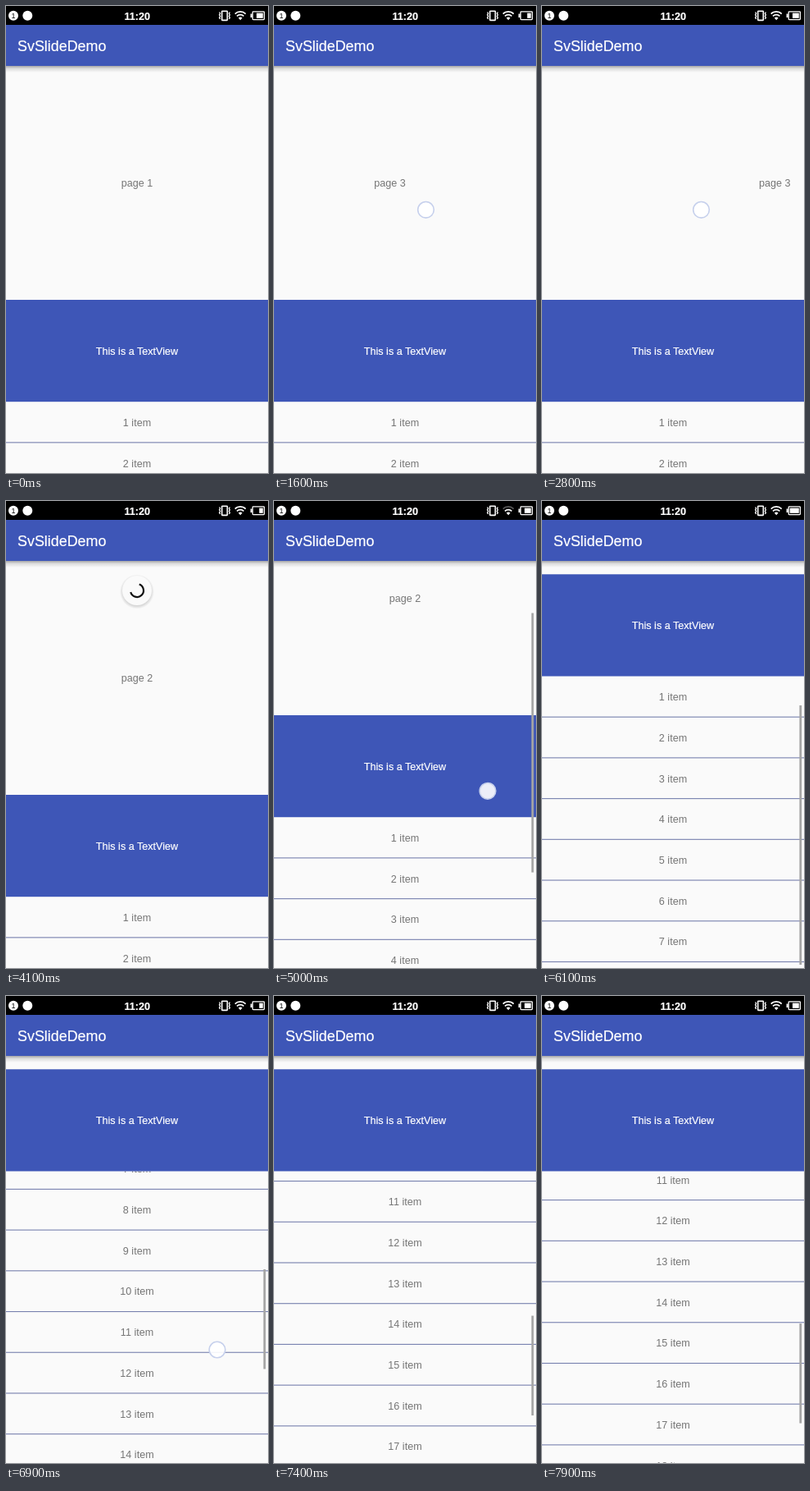
Write an HTML page that moves like this. It is 320 px wide and 569 px high and loops after 8000 ms.

```html
<!DOCTYPE html>
<html lang="en">
<head>
<meta charset="utf-8">
<title>SvSlideDemo</title>
<style>
html, body { margin: 0; width: 100%; height: 100%; overflow: hidden; background: #fafafa; }
svg { display: block; width: 100vw; height: 100vh; }
text { font: 12.6px "Liberation Sans", Arial, sans-serif; text-anchor: middle; fill: #757575; }
text.light { fill: #fff; stroke: #fff; stroke-width: .2; }
</style>
</head>
<body>
<svg id="stage" viewBox="0 0 320 569">
  <defs>
    <linearGradient id="shade" x1="0" y1="0" x2="0" y2="1">
      <stop offset="0" stop-color="#000" stop-opacity=".34"/>
      <stop offset=".4" stop-color="#000" stop-opacity=".12"/>
      <stop offset="1" stop-color="#000" stop-opacity="0"/>
    </linearGradient>
    <radialGradient id="halo">
      <stop offset=".82" stop-color="#000" stop-opacity=".14"/>
      <stop offset="1" stop-color="#000" stop-opacity="0"/>
    </radialGradient>
    <clipPath id="below"><rect id="window" width="320" height="569"/></clipPath>
  </defs>
  <rect width="320" height="569" fill="#fafafa"/>
  <g id="pages"></g>
  <g clip-path="url(#below)"><g id="list"></g></g>
  <g id="header">
    <rect width="320" height="124.2" fill="#3e56b7"/>
    <text class="light" x="160" y="66.8">This is a TextView</text>
  </g>
  <rect id="bar" x="314.4" width="2.8" fill="#a5a5a5"/>
  <g id="spinner">
    <circle cy="1.5" r="21" fill="url(#halo)"/>
    <circle r="18" fill="#fafafa"/>
    <path id="arc" fill="none" stroke="#111" stroke-width="2.2"/>
    <path id="arrow" d="M-3.5 0h7l-3.5 4z" fill="#111"/>
  </g>
  <rect y="73" width="320" height="8" fill="url(#shade)"/>
  <rect y="23" width="320" height="50" fill="#3e56b7"/>
  <text class="light" x="14" y="55" style="font-size:17.9px;text-anchor:start">SvSlideDemo</text>
  <g id="status">
    <rect width="320" height="23" fill="#000"/>
    <circle cx="9" cy="11.7" r="6" fill="#fff"/>
    <text x="9" y="15" style="font-size:9px;fill:#000">1</text>
    <circle cx="26.3" cy="11.7" r="6" fill="#fff"/>
    <text class="light" x="160.3" y="16.6" style="font-size:12.7px;font-weight:bold">11:20</text>
    <g fill="none" stroke="#fff" stroke-width="1.3">
      <rect x="263.7" y="6.2" width="6.6" height="11.2" rx=".6" stroke-width="1.6"/>
      <path d="M260.6 7.5l1 1.6-1 1.7 1 1.7-1 1.7 1 1.6M273.4 7.5l-1 1.6 1 1.7-1 1.7 1 1.7-1 1.6"/>
      <path id="wifi" d="M279.7 9.6a9.3 9.3 0 0 1 13 0" stroke-width="1.7"/>
      <path d="M282 12.4a6 6 0 0 1 8.4 0" stroke-width="1.7"/>
      <rect x="301.2" y="6.8" width="14.2" height="9.8" rx=".8"/>
    </g>
    <path d="M283.8 14.6a3.4 3.4 0 0 1 4.8 0l-2.4 2.6z" fill="#fff"/>
    <rect x="298.6" y="9.5" width="2" height="4.5" fill="#fff"/>
    <rect id="charge" y="8.6" height="6.2" fill="#fff"/>
  </g>
  <circle id="touch" r="9.8" fill="#fff" fill-opacity=".9" stroke="#c6d0ec" stroke-width="1.6"/>
</svg>
<script>
const LOOP = 8000, STEP = 100, ROW = 49.72, HEAD_Y = 358, HEAD_H = 124.2;
const $ = id => document.getElementById(id);

// page swipes: start time and direction, +1 to the next page
const SWIPE_MS = 500;
const swipes = [[100, 1], [900, 1], [1500, 1], [2050, -1], [2580, -1]]
  .map(([start, dir]) => ({ start, dir }));

// vertical finger strokes
const drags = [
  { start: 3300, ms: 500, x: 208, from: 250, to: 435 },
  { start: 4800, ms: 300, x: 261, from: 480, to: 290 },
  { start: 5600, ms: 300, x: 256, from: 360, to: 374 },
  { start: 6300, ms: 200, x: 257, from: 495, to: 345 },
  { start: 6800, ms: 200, x: 258, from: 480, to: 382 }
];

const mix = (a, b, k) => a + (b - a) * k;
const phase = (t, start, ms) => Math.max(0, Math.min(1, (t - start) / ms));
const smooth = k => k * k * (3 - 2 * k);
const smoother = k => k * k * k * (k * (6 * k - 15) + 10);
const glide = k => 1 - (1 - k) ** 3;

const pageAt = t => swipes.reduce((p, s) => p + s.dir * smoother(phase(t, s.start, SWIPE_MS)), 0);
const scrollAt = t => 275.5 * smooth(phase(t, 4800, 500)) - 6.8 * smooth(phase(t, 5600, 400));
const rowsAt = t => 298.3 * smooth(phase(t, 6250, 600)) + 213.5 * glide(phase(t, 6850, 1100));

function add(parent, name, attrs, text) {
  const el = document.createElementNS("http://www.w3.org/2000/svg", name);
  for (const k in attrs) el.setAttribute(k, attrs[k]);
  if (text) el.textContent = text;
  return parent.appendChild(el);
}

function set(id, attrs) {
  for (const k in attrs) $(id).setAttribute(k, attrs[k]);
}

const move = (id, x, y, more = "") => set(id, { transform: `translate(${x} ${y}) ${more}` });
const show = (id, on) => set(id, { visibility: on ? "visible" : "hidden" });

for (let i = 0; i < 4; i++) add($("pages"), "text", { x: 160 + i * 320, y: 220.3 }, `page ${i + 1}`);
for (let i = 0; i < 20; i++) {
  add($("list"), "text", { x: 160, y: i * ROW + 29.6 }, `${i + 1} item`);
  add($("list"), "rect", { y: (i + 1) * ROW - .6, width: 320, height: 1.1, fill: "#7780ae" });
}

function drawSpinner(t) {
  const pull = phase(t, 3400, 400), spinning = t >= 3900;
  const y = mix(50, 137, pull) - 28 * smooth(phase(t, 3800, 200));
  const start = spinning ? -70 + (t - 4100) * .62 : -90 + pull * 150;
  const sweep = spinning ? 235 + 40 * Math.sin((t - 4100) / 210) : 20 + pull * 270;
  const end = start + sweep, opacity = mix(.3, 1, pull);
  const point = deg => {
    const a = deg * Math.PI / 180;
    return `${8 * Math.cos(a)} ${8 * Math.sin(a)}`;
  };
  show("spinner", t >= 3400 && t < 4500);
  move("spinner", 160, y, `scale(${1 - phase(t, 4300, 200)})`);
  set("arc", { d: `M${point(start)}A8 8 0 ${sweep > 180 ? 1 : 0} 1 ${point(end)}`, opacity });
  set("arrow", { transform: `rotate(${end}) translate(8 0)`, opacity: spinning ? 0 : opacity });
}

function drawBar(t, scroll, rows) {
  const outer = t < 6300;
  const top = outer ? 73 + scroll * .655 : 217 + rows * .3557;
  const bottom = outer ? Math.min(566, top + 316) : top + 121.5;
  set("bar", { y: top, height: bottom - top });
  show("bar", t >= 4900);
}

function drawTouch(t) {
  const during = (s, ms) => t >= s.start && t <= s.start + ms;
  const swipe = swipes.find(s => during(s, SWIPE_MS / 2));
  const drag = drags.find(d => during(d, d.ms));
  show("touch", swipe || drag);
  if (swipe) {
    const k = phase(t, swipe.start, SWIPE_MS);
    move("touch", 160 + swipe.dir * (75.5 - 250 * k), 248.3);
  } else if (drag) {
    move("touch", drag.x, mix(drag.from, drag.to, phase(t, drag.start, drag.ms)));
  }
}

function render(time) {
  const t = Math.floor(time % LOOP / STEP) * STEP;
  const scroll = scrollAt(t), rows = rowsAt(t);
  const top = HEAD_Y - scroll;
  move("pages", -320 * pageAt(t), -scroll);
  move("header", 0, top);
  set("window", { y: top + HEAD_H });
  move("list", 0, top + HEAD_H - rows);
  drawSpinner(t);
  drawBar(t, scroll, rows);
  drawTouch(t);
  const level = Math.floor((t + 800) % 2400 / 800);
  const fill = 4.5 + 3.3 * level;
  set("charge", { x: 313.8 - fill, width: fill });
  set("wifi", { opacity: t >= 4900 && t < 5700 ? .35 : 1 });
}

const begin = performance.now();
function tick() {
  render(performance.now() - begin);
  requestAnimationFrame(tick);
}
tick();
</script>
</body>
</html>
```
